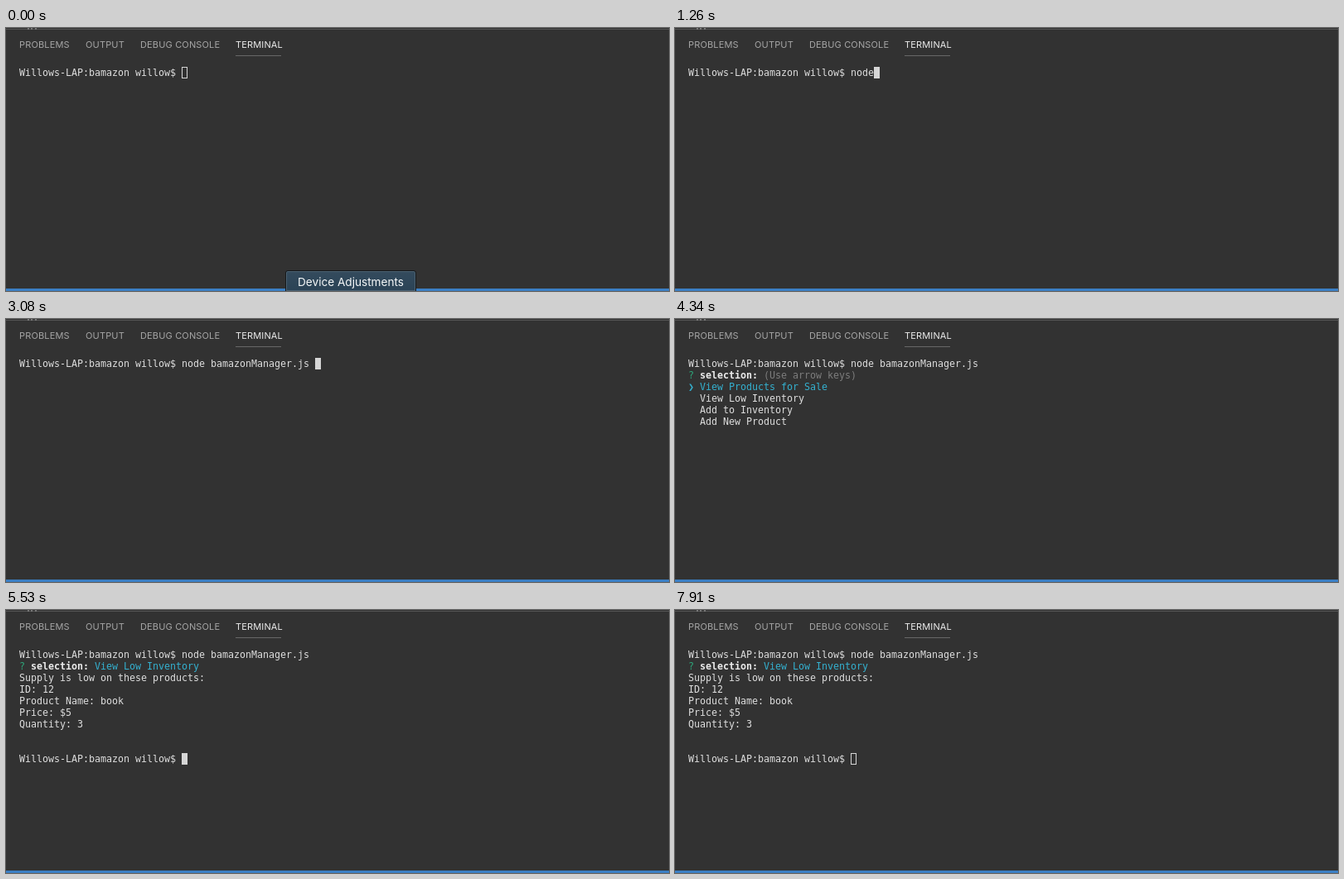
Write an HTML page that moves like this. It is 800 by 318 pixels and loops after 7980 ms.

```html
<!DOCTYPE html>
<html lang="en">
<head>
<meta charset="utf-8">
<title>Terminal session</title>
<style>
  html, body { margin: 0; width: 100%; height: 100%; overflow: hidden; background: #323232; }
  #stage { position: relative; width: 800px; height: 318px; overflow: hidden; background: #323232; }
  #stage * { position: absolute; white-space: pre; box-sizing: border-box; }
  .edge { left: 0; top: 1px; width: 800px; height: 1px; background: #555; }
  .tick { top: 0; width: 2px; height: 2px; background: #777; }
  .tab { top: 10px; font: 11px/20px Inter, "Open Sans", sans-serif; letter-spacing: .15px; color: #a6a6a6; }
  .tab.on { color: #ececec; }
  .rule { left: 277px; top: 33px; width: 55px; height: 1px; background: #686868; }
  .status { left: 0; top: 315px; width: 800px; height: 3px; background: #3b7fc4; }
  #tip {
    left: 337px; top: 293px; width: 158px; height: 26px; border: 1px solid #15181b;
    border-radius: 3px 3px 0 0; background: linear-gradient(#344b5d, #2b4356);
    box-shadow: inset 0 0 0 1px #4c6272;
    font: 13.6px/26px Inter, "Open Sans", sans-serif; color: #f6f8f9; text-align: center;
  }
  #screen { left: 16px; top: 47px; font: 11.63px/14px "DejaVu Sans Mono", "Liberation Mono", monospace; }
  #screen span { color: #dedede; }
  #screen .green { color: #2ea579; }
  #screen .cyan { color: #34b1d0; }
  #screen .dim { color: #7d7d7d; }
  #screen .bold { color: #ebebeb; font-weight: bold; }
  #cursor { width: 7px; height: 14px; border: 1px solid #d6d6d6; }
  #cursor.solid { background: #d6d6d6; }
</style>
</head>
<body>
<div id="stage">
  <div class="edge"></div>
  <div class="tick" style="left:26px"></div>
  <div class="tick" style="left:30px"></div>
  <div class="tick" style="left:35px"></div>
  <div class="tab" style="left:16px">PROBLEMS</div>
  <div class="tab" style="left:96px">OUTPUT</div>
  <div class="tab" style="left:162px">DEBUG CONSOLE</div>
  <div class="tab on" style="left:277px">TERMINAL</div>
  <div class="rule"></div>
  <div id="screen"></div>
  <div class="status"></div>
  <div id="tip">Device Adjustments</div>
</div>
<script>
const LOOP = 7980, CELL_W = 7, CELL_H = 14;
const PROMPT = 'Willows-LAP:bamazon willow$ ';
const CHOICES = ['View Products for Sale', 'View Low Inventory', 'Add to Inventory', 'Add New Product'];
const RESULT = ['Supply is low on these products:', 'ID: 12', 'Product Name: book', 'Price: $5', 'Quantity: 3'];

// Moment and text on the command line; jumps are tab completions.
const TYPING = [
  [0, ''], [910, 'n'], [1050, 'no'], [1120, 'nod'], [1190, 'node'], [1330, 'node '],
  [1400, 'node b'], [1470, 'node ba'], [1540, 'node bam'], [1610, 'node bamazon'],
  [1680, 'node bamazonMa'], [2660, 'node bamazonManager.js ']
];
const AT = { tipOff: 70, focus: 280, run: 3150, menu: 3710, down: 4480, result: 5110, blur: 7140 };

const screen = document.getElementById('screen');
const tip = document.getElementById('tip');

function put(row, col, text, cls = '') {
  const el = document.createElement('span');
  el.className = cls;
  el.textContent = text;
  el.style.left = col * CELL_W + 'px';
  el.style.top = row * CELL_H + 'px';
  screen.append(el);
  return el;
}

function putCursor(row, col, solid) {
  put(row, col, '', solid ? 'solid' : '').id = 'cursor';
}

function putQuestion(note, cls) {
  put(1, 0, '?', 'green');
  put(1, 2, 'selection:', 'bold');
  put(1, 13, note, cls);
}

function putMenu(active) {
  putQuestion(active ? '' : '(Use arrow keys)', 'dim');
  CHOICES.forEach((choice, i) => {
    if (i === active) put(2 + i, 0, '❯', 'cyan');
    put(2 + i, 2, choice, i === active ? 'cyan' : '');
  });
}

function draw(t) {
  const typed = TYPING.filter(([at]) => at <= t).pop()[1];
  const solid = t >= AT.focus && t < AT.blur;
  screen.replaceChildren();
  tip.style.display = t < AT.tipOff ? 'block' : 'none';
  put(0, 0, PROMPT + typed);
  if (t < AT.run) {
    putCursor(0, PROMPT.length + typed.length, solid);
  } else if (t < AT.menu) {
    putCursor(1, 0, solid);
  } else if (t < AT.result) {
    putMenu(t < AT.down ? 0 : 1);
  } else {
    putQuestion(CHOICES[1], 'cyan');
    RESULT.forEach((line, i) => put(2 + i, 0, line));
    put(9, 0, PROMPT);
    putCursor(9, PROMPT.length, solid);
  }
}

const CUTS = [...TYPING.map(step => step[0]), ...Object.values(AT)].sort((a, b) => a - b);
const start = performance.now();
let shown = -1;

function tick() {
  const t = (performance.now() - start) % LOOP;
  const cut = CUTS.filter(at => at <= t).pop();
  if (cut !== shown) draw(shown = cut);
  requestAnimationFrame(tick);
}
tick();
</script>
</body>
</html>
```
